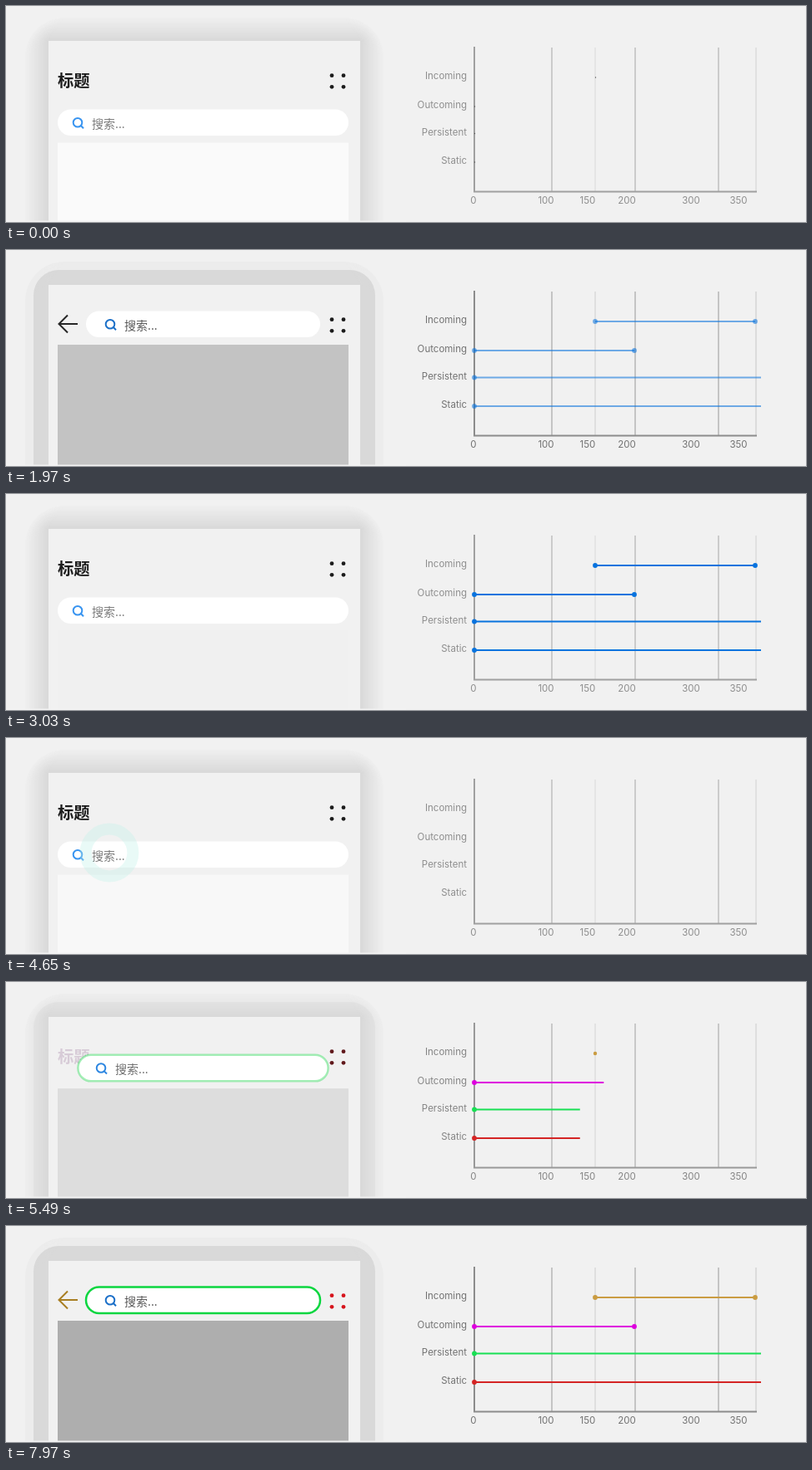
An HTML page with a canvas for the animation above (7990 ms loop, 960 px wide and 260 px high).

```html
<!DOCTYPE html>
<html lang="zh">
<head>
<meta charset="utf-8">
<style>
html, body { margin: 0; width: 100%; height: 100%; overflow: hidden; background: #f1f1f1; }
canvas { display: block; }
</style>
</head>
<body>
<canvas id="stage" width="960" height="260"></canvas>
<script>
const ctx = document.getElementById('stage').getContext('2d');
const LOOP = 7990, SLOW = 2.5, LENGTH = 350;
const LATIN = '11.5px Inter, sans-serif';
const CJK = '"Noto Sans CJK SC", "Noto Sans CJK", sans-serif';
const BLACK = [28, 28, 28];
const BLUE = Array(4).fill([8, 115, 222]);
const COLORS = [[202, 156, 66], [222, 0, 222], [24, 224, 84], [212, 36, 36]];

const RUNS = [
  { until: 2155, start: 400, fadeAt: 1870, fade: 220, lines: BLUE, panel: [250, 195], seed: 0.7 },
  { until: 4640, start: 2155, fadeAt: 3525, fade: 125, lines: BLUE, panel: [240, 195], back: true },
  { until: LOOP, start: 5131, fadeAt: LOOP, fade: 1, lines: COLORS, panel: [248, 174], tinted: true }
];
const TRACKS = [
  { name: 'Incoming', y: 86, from: 150, to: 350, x1: 707, x2: 899, closed: true },
  { name: 'Outcoming', y: 121, from: 0, to: 200, x1: 562, x2: 754, closed: true },
  { name: 'Persistent', y: 153.5, from: 0, to: 350, x1: 562, x2: 906 },
  { name: 'Static', y: 188, from: 0, to: 350, x1: 562, x2: 906 }
];
const GRID = [[655, 1.5, 190], [707, 1, 216], [755, 1.5, 190], [855, 1.5, 190], [900, 1, 208]];
const TICKS = [[561, 0], [648, 100], [698, 150], [745, 200], [822, 300], [879, 350]];

const clamp = v => Math.max(0, Math.min(1, v));
const mix = (a, b, p) => a + (b - a) * p;
const smooth = v => { v = clamp(v); return v * v * (3 - 2 * v); };
const rgb = c => `rgb(${c.map(Math.round).join()})`;
const gray = v => rgb([v, v, v]);
const blend = (a, b, p) => a.map((v, i) => mix(v, b[i], p));

// cubic-bezier(.2, 0, .2, 1)
function friction(x) {
  x = clamp(x);
  let low = 0, high = 1;
  for (let i = 0; i < 24; i++) {
    const s = (low + high) / 2;
    if (0.6 * s * (1 - s) + s ** 3 < x) low = s; else high = s;
  }
  return low * low * (3 - 2 * low);
}

function box(x, y, w, h, r, color) {
  ctx.beginPath();
  ctx.roundRect(x, y, w, h, r);
  ctx.fillStyle = color;
  ctx.fill();
}
function disc(x, y, r, color) {
  ctx.beginPath();
  ctx.arc(x, y, r, 0, 7);
  ctx.fillStyle = color;
  ctx.fill();
}
function stroke(points, width, color) {
  ctx.beginPath();
  points.forEach(p => ctx.lineTo(...p));
  ctx.lineWidth = width;
  ctx.strokeStyle = color;
  ctx.stroke();
}
function ring(x, y, r, width, color) {
  ctx.beginPath();
  ctx.arc(x, y, r, 0, 7);
  ctx.lineWidth = width;
  ctx.strokeStyle = color;
  ctx.stroke();
}
function text(value, x, y, font, color, align = 'left') {
  ctx.font = font;
  ctx.textAlign = align;
  ctx.textBaseline = 'middle';
  ctx.fillStyle = color;
  ctx.fillText(value, x, y);
}
function withAlpha(alpha, draw) {
  ctx.globalAlpha = clamp(alpha);
  draw();
  ctx.globalAlpha = 1;
}

function drawPhone(t, run, time) {
  const at = p => run.back ? 1 - p : p;
  const move = at(friction(time / LENGTH));
  const tone = at(smooth(time / LENGTH));
  const entering = smooth((time - 150) / 200);
  const leaving = 1 - smooth(time / 200);
  const [titleAlpha, arrowAlpha] = run.back ? [entering, leaving] : [leaving, entering];
  const tint = (color, p) => run.tinted ? blend(BLACK, color, p) : BLACK;

  for (let d = 28; d >= 0; d--) {
    const soft = mix(216, 239, d / 28);
    const band = d > 18 ? 236 : 217;
    box(51 - d, 42 - d, 374 + 2 * d, 300, d * 1.7, gray(mix(soft, band, tone)));
  }
  box(51, 42, 374, 218, 0, '#f1f1f1');

  const light = run.back && t > 3530 ? 249 : run.panel[0];
  const panelTop = mix(164.5, 114, move);
  box(62, panelTop, 349, 260 - panelTop, 0, gray(mix(light, run.panel[1], tone)));

  withAlpha(titleAlpha, () =>
    text('标题', 62, 90, `bold 19.3px ${CJK}`, rgb(tint([130, 50, 130], 1 - titleAlpha))));
  withAlpha(arrowAlpha, () => {
    const color = run.tinted ? '#a87e22' : '#262626';
    stroke([[86, 89], [64, 89]], 2, color);
    stroke([[74, 78.5], [63.5, 89], [74, 99.5]], 2, color);
  });
  for (const x of [391, 405])
    for (const y of [83.7, 97.3]) disc(x, y, 2.4, rgb(tint([214, 20, 28], tone)));

  const x = mix(62, 96, move), y = mix(124.5, 73.5, move);
  const width = mix(349, 281, move), dx = 39 * move, mid = y + 16;
  box(x, y, width, 31.5, 15.7, '#fff');
  if (run.tinted) withAlpha(tone, () => {
    ctx.lineWidth = 2.5;
    ctx.strokeStyle = '#0cd640';
    ctx.stroke();
  });
  const blue = rgb(blend([56, 148, 240], [28, 112, 200], tone));
  ring(86 + dx, mid - 0.3, 5.3, 2, blue);
  stroke([[89.8 + dx, mid + 3.5], [93 + dx, mid + 6.7]], 2, blue);
  text('搜索...', 103 + dx, mid + 1, `500 14px ${CJK}`, gray(mix(122, 88, tone)));
  box(0, 258.5, 480, 2, 0, '#f3f3f3');
}

function drawTouch(t, start, length, x, y) {
  const p = (t - start) / length;
  if (p < 0 || p > 1) return;
  const press = Math.sin(Math.PI * p);
  const alpha = p < 0.6 ? mix(0.4, 0.8, clamp(p * 3)) : 2 * (1 - p);
  withAlpha(alpha, () => ring(x, y, 29 - 9 * press, 14, 'rgba(190,240,230,.8)'));
}

function drawChart(t, run, time) {
  const tone = run.back ? 1 - smooth(time / LENGTH) : smooth(time / LENGTH);
  const ink = gray(mix(142, 114, tone));
  for (const [x, width, shade] of GRID)
    stroke([[x, 50], [x, 223]], width, gray(shade - 10 * tone));
  stroke([[562, 49], [562, 223.5], [901, 223.5]], 2, gray(mix(160, 140, tone)));
  for (const [x, value] of TICKS) text(value, x, 234.5, LATIN, ink, 'center');
  for (const track of TRACKS)
    text(track.name, 553, Math.round(track.y - 0.6), LATIN, ink, 'right');

  withAlpha(1 - smooth((t - run.fadeAt) / run.fade), () => TRACKS.forEach((track, i) => {
    const { from, to, x1, x2, y } = track;
    const color = rgb(run.lines[i]);
    const seed = run.seed || 0;
    if (time < 0) return disc(x1 + 0.5, y, seed, '#555');
    disc(x1, y, Math.max(seed, 2.9 * clamp((time - from + 25) / 25)), color);
    const p = smooth((time - from) / (to - from));
    if (p > 0) stroke([[x1, y], [mix(x1, x2, p), y]], 2.2, color);
    if (track.closed && time > to - 12) disc(x2, y, 2.9 * clamp((time - to + 12) / 12), color);
  }));
}

function frame() {
  const t = performance.now() % LOOP;
  const run = RUNS.find(r => t < r.until);
  const time = (t - run.start) / SLOW;
  box(0, 0, 960, 260, 0, '#f1f1f1');
  drawPhone(t, run, time);
  drawTouch(t, 2000, 290, 74, 89);
  drawTouch(t, 4640, 500, 124, 138);
  drawChart(t, run, time);
  requestAnimationFrame(frame);
}
frame();
</script>
</body>
</html>
```
